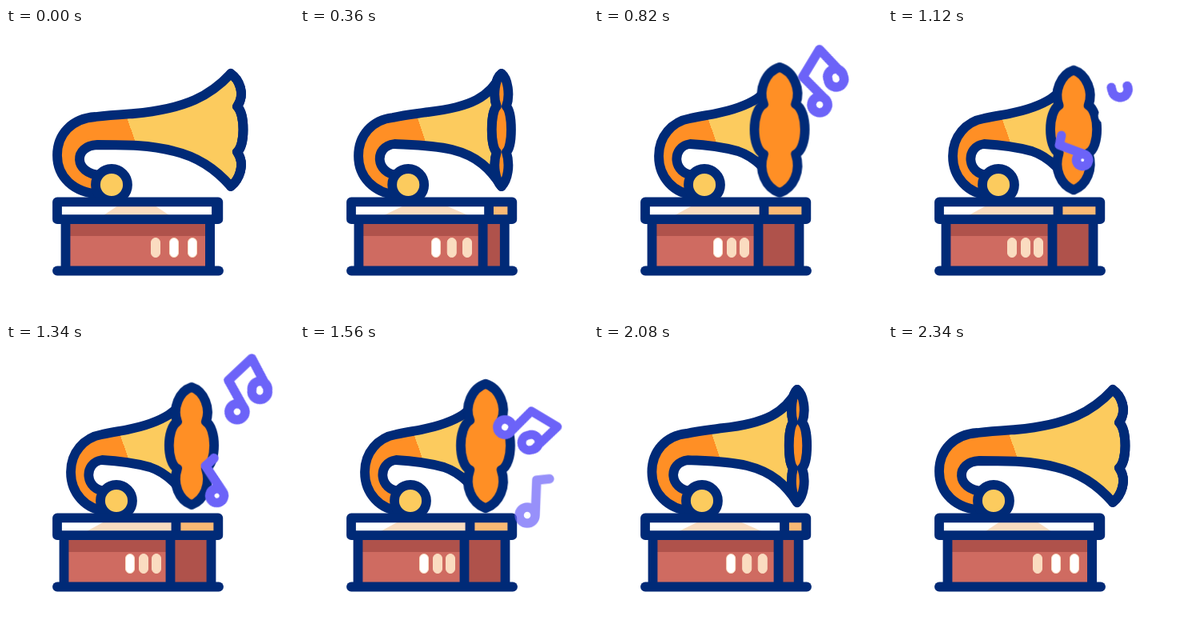
An HTML page without scripts for the animation above (2.4 s loop, 360x360 px).

```html
<!DOCTYPE html>
<html lang="en">
<head>
<meta charset="utf-8">
<title>Gramophone</title>
<style>
@property --turn { syntax: "<number>"; inherits: true; initial-value: 0; }

html, body { margin: 0; width: 100%; height: 100%; overflow: hidden; background: #fff; }
svg {
  --navy: #002a77; --yellow: #fccb5e; --orange: #ff8f25;
  --red: #cf6b61; --dark: #af524b; --peach: #fadcc0; --violet: #6c63f8;
  display: block; width: 100%; height: 100%;
  animation: turn 2.4s infinite;
}
.line { fill: none; stroke: var(--navy); stroke-width: 11.8; stroke-linecap: round; stroke-linejoin: round; }
.left { transform: translateX(calc(var(--turn) * -2px)); }
.right { transform: translateX(calc(var(--turn) * 1.5px)); }
.side { transform: translateX(calc(var(--turn) * -49.5px)); }
.rim { transform: translateX(calc(var(--turn) * -50.5px)); }
.pivot { fill: var(--yellow); transform: translateX(calc(var(--turn) * 6px)); }
.slot { stroke: var(--peach); transform: translateX(calc(var(--turn) * var(--shift))); animation: slots 2.4s step-end infinite; }
.slot.first { animation-name: firstSlot; }

.horn { fill: url(#brass); animation: horn 2.4s infinite; }
.bell { fill: var(--orange); vector-effect: non-scaling-stroke; transform-origin: 232px 127.5px; animation: bell 2.4s infinite, pulse 2.4s infinite; }
.glow { fill: var(--peach); animation: glow 2.4s infinite; }

.note { opacity: 0; animation: 2.4s linear infinite; }
.note circle { fill: #fff; }
.note path {
  fill: none; stroke: var(--violet); stroke-width: 11.5; stroke-linecap: round; stroke-linejoin: round;
  stroke-dasharray: 1 2; animation: 2.4s linear infinite;
}
.rise { animation-name: rise; }
.rise path { animation-name: drawRise; }
.again, .again path { animation-delay: -1.96s; }
.fall { animation-name: fall; }
.fall path { animation-name: drawFall; }
.drift { animation-name: drift; }
.drift path { animation-name: drawDrift; }

@keyframes turn {
  0%, 97.5%, 100% { --turn: 0; }
  3.75% { --turn: 0; animation-timing-function: ease-in; }
  15% { --turn: .53; animation-timing-function: ease-out; }
  26.25% { --turn: 1; }
  75% { --turn: 1; animation-timing-function: ease-in; }
  86.25% { --turn: .53; animation-timing-function: ease-out; }
}
@keyframes horn {
  0%, 3.75%, 97.5%, 100% {
    d: path("M281 57C256 84 226 101 160 107C146 108 130 109 112 111C82 113 64 133 64 159C64 186 84 206 118 208L118 184C84 182 84 147 114 146C150 146 180 146 210 154C240 161 262 176 281 198C291 190 300 171 289 155C299 146 299 108 289 98C300 82 291 64 281 57Z");
    animation-timing-function: ease-in;
  }
  15%, 86.25% {
    d: path("M252 57C238 86 214 99 160 105C148 107 134 108 116 112C90 115 73 134 73 160C73 186 92 206 121 209L122 184C94 182 92 148 118 145C136 146 165 146 190 152C222 160 238 176 252 198C244 190 241 171 246 155C238 148 238 106 246 98C241 84 244 63 252 57Z");
    animation-timing-function: ease-out;
  }
  26.25%, 75% {
    d: path("M232 56C218 84 196 98 152 107C142 109 134 110 120 113C97 117 81 136 81 160C81 187 100 207 126 209L126 184C98 184 96 148 120 145C140 146 158 148 180 154C204 162 219 182 232 199C217 193 209 174 215 155C202 148 202 106 215 98C209 82 217 61 232 56Z");
    animation-timing-function: ease-in;
  }
}
@keyframes bell {
  0%, 3.75%, 97.5%, 100% {
    d: path("M281 57C291 64 300 82 289 98C299 108 299 146 289 155C300 171 291 190 281 198C291 190 300 171 289 155C299 146 299 108 289 98C300 82 291 64 281 57Z");
    animation-timing-function: ease-in;
  }
  15%, 86.25% {
    d: path("M252 57C260 63 263 84 258 98C266 106 266 148 258 155C263 171 260 190 252 198C244 190 241 171 246 155C238 148 238 106 246 98C241 84 244 63 252 57Z");
    animation-timing-function: ease-out;
  }
  26.25%, 75% {
    d: path("M232 56C247 61 255 82 249 98C262 106 262 148 249 155C255 174 247 193 232 199C217 193 209 174 215 155C202 148 202 106 215 98C209 82 217 61 232 56Z");
    animation-timing-function: ease-in;
  }
}
@keyframes pulse {
  0%, 26.7%, 42.8%, 58.9%, 75%, 100% { transform: none; animation-timing-function: ease-in-out; }
  34.7%, 50.8%, 66.9% { transform: scale(1.18, 1.1); animation-timing-function: ease-in-out; }
}
@keyframes glow {
  0%, 3.75%, 97.5%, 100% { d: path("M122 234L140 222L186 222L204 234Z"); animation-timing-function: ease-in; }
  15%, 86.25% { d: path("M105 234L130 222L182 222L210 234Z"); animation-timing-function: ease-out; }
  26.25%, 75% { d: path("M101 234L123 222L208 222L208 234Z"); animation-timing-function: ease-in; }
}
@keyframes slots {
  0%, 90% { fill: #fff; }
  10% { fill: var(--peach); }
}
@keyframes firstSlot {
  0%, 45%, 90% { fill: var(--peach); }
  10%, 55% { fill: #fff; }
}

@keyframes rise {
  0%, 27.49% { opacity: 0; transform: translate(270px, 112px) rotate(-63deg); }
  27.5% { opacity: 1; transform: translate(270px, 112px) rotate(-63deg); }
  34.17% { transform: translate(282px, 96px) rotate(-59deg); }
  42.5% { opacity: 1; transform: translate(299px, 68px) rotate(-20deg); }
  45%, 100% { opacity: 0; transform: translate(300px, 67px) rotate(-18deg); }
}
@keyframes drawRise {
  0%, 27.5% { stroke-dashoffset: 1; }
  33.3%, 100% { stroke-dashoffset: 0; }
}
@keyframes fall {
  0%, 41.66% { opacity: 0; transform: translate(228px, 150px) rotate(-85deg) scale(.6); }
  41.67% { opacity: 1; transform: translate(228px, 150px) rotate(-85deg) scale(.6); }
  46.67% { transform: translate(243px, 165px) rotate(-71deg) scale(.76); }
  61% { opacity: 1; }
  65% { opacity: .72; transform: translate(284px, 214px) rotate(1deg) scale(1); }
  68.3%, 100% { opacity: 0; transform: translate(288px, 218px) rotate(4deg) scale(1); }
}
@keyframes drawFall {
  0%, 41.67% { stroke-dashoffset: 1; stroke-width: 15; }
  46.5% { stroke-dashoffset: 0; stroke-width: 15; }
  65%, 100% { stroke-dashoffset: 0; stroke-width: 11.5; }
}
@keyframes drift {
  0%, 59.16% { opacity: 0; transform: translate(240px, 110px) rotate(42deg); }
  59.17% { opacity: 1; transform: translate(240px, 110px) rotate(42deg); }
  65% { transform: translate(256px, 104px) rotate(31deg) scale(.95); }
  72.5% { transform: translate(280px, 99px) rotate(14deg); }
  78.33% { opacity: 1; transform: translate(281px, 99px) rotate(13deg); }
  81.67%, 100% { opacity: 0; transform: translate(282px, 99px) rotate(12deg); }
}
@keyframes drawDrift {
  0%, 59.17% { stroke-dashoffset: 1; }
  64.2%, 100% { stroke-dashoffset: 0; }
}
</style>
</head>
<body>
<svg viewBox="0 0 360 360">
  <defs>
    <linearGradient id="brass" gradientUnits="userSpaceOnUse" x1="127" y1="136" x2="185" y2="116">
      <stop offset=".5" stop-color="#ff8f25"/>
      <stop offset=".5" stop-color="#fccb5e"/>
      <animateTransform attributeName="gradientTransform" type="translate" dur="2.4s" repeatCount="indefinite"
        calcMode="spline" values="0 0;0 0;-9 0;-9 0;0 0;0 0" keyTimes="0;.0375;.2625;.75;.975;1"
        keySplines="0 0 1 1;.42 0 .58 1;0 0 1 1;.42 0 .58 1;0 0 1 1"/>
    </linearGradient>
    <clipPath id="body"><rect x="74" y="240" width="182" height="64"/></clipPath>
    <clipPath id="slab"><rect x="64" y="217" width="201" height="23"/></clipPath>
  </defs>

  <g clip-path="url(#body)">
    <rect x="74" y="240" width="182" height="64" fill="var(--red)"/>
    <rect x="74" y="240" width="182" height="20" fill="var(--dark)"/>
    <rect class="side" x="255" y="240" width="60" height="64" fill="var(--dark)"/>
  </g>
  <rect class="slot first" style="--shift:-32px" x="181.5" y="262.5" width="11" height="24" rx="5.5"/>
  <rect class="slot" style="--shift:-38px" x="204.5" y="262.5" width="11" height="24" rx="5.5"/>
  <rect class="slot" style="--shift:-45px" x="227.5" y="262.5" width="11" height="24" rx="5.5"/>
  <path class="line side" d="M255 242V302"/>
  <path class="line left" d="M74.5 242V302"/>
  <path class="line right" d="M255 242V302"/>
  <path class="line" d="M64 303.5H266"/>

  <path class="line horn"/>
  <path class="line bell"/>
  <circle class="line pivot" cx="132" cy="196" r="20"/>

  <g clip-path="url(#slab)">
    <rect x="64" y="217" width="201" height="23" fill="#fff"/>
    <path class="glow"/>
    <rect class="rim" x="263" y="217" width="60" height="23" fill="#fbb974"/>
    <path class="line rim" d="M263 217V240"/>
  </g>
  <rect class="line" x="64" y="217.3" width="201.3" height="21.9"/>

  <g class="note rise">
    <circle r="9"/><circle cx="39" r="9"/>
    <path id="pair" pathLength="1" d="M46 7A10 10 0 1 1 32-7A10 10 0 1 1 46 7A10 10 0 0 0 49 0L59-36L19-36L10 0A10 10 0 1 1-10 0A10 10 0 1 1 10 0"/>
  </g>
  <g class="note rise again">
    <circle r="9"/><circle cx="39" r="9"/>
    <path pathLength="1" d="M46 7A10 10 0 1 1 32-7A10 10 0 1 1 46 7A10 10 0 0 0 49 0L59-36L19-36L10 0A10 10 0 1 1-10 0A10 10 0 1 1 10 0"/>
  </g>
  <g class="note fall">
    <circle r="9"/>
    <path pathLength="1" d="M10 0A10 10 0 1 1-10 0A10 10 0 1 1 10 0L11-44L27-46"/>
  </g>
  <g class="note drift">
    <circle r="9"/><circle cx="39" r="9"/>
    <path pathLength="1" d="M46 7A10 10 0 1 1 32-7A10 10 0 1 1 46 7A10 10 0 0 0 49 0L59-36L19-36L10 0A10 10 0 1 1-10 0A10 10 0 1 1 10 0"/>
  </g>
</svg>
</body>
</html>
```
